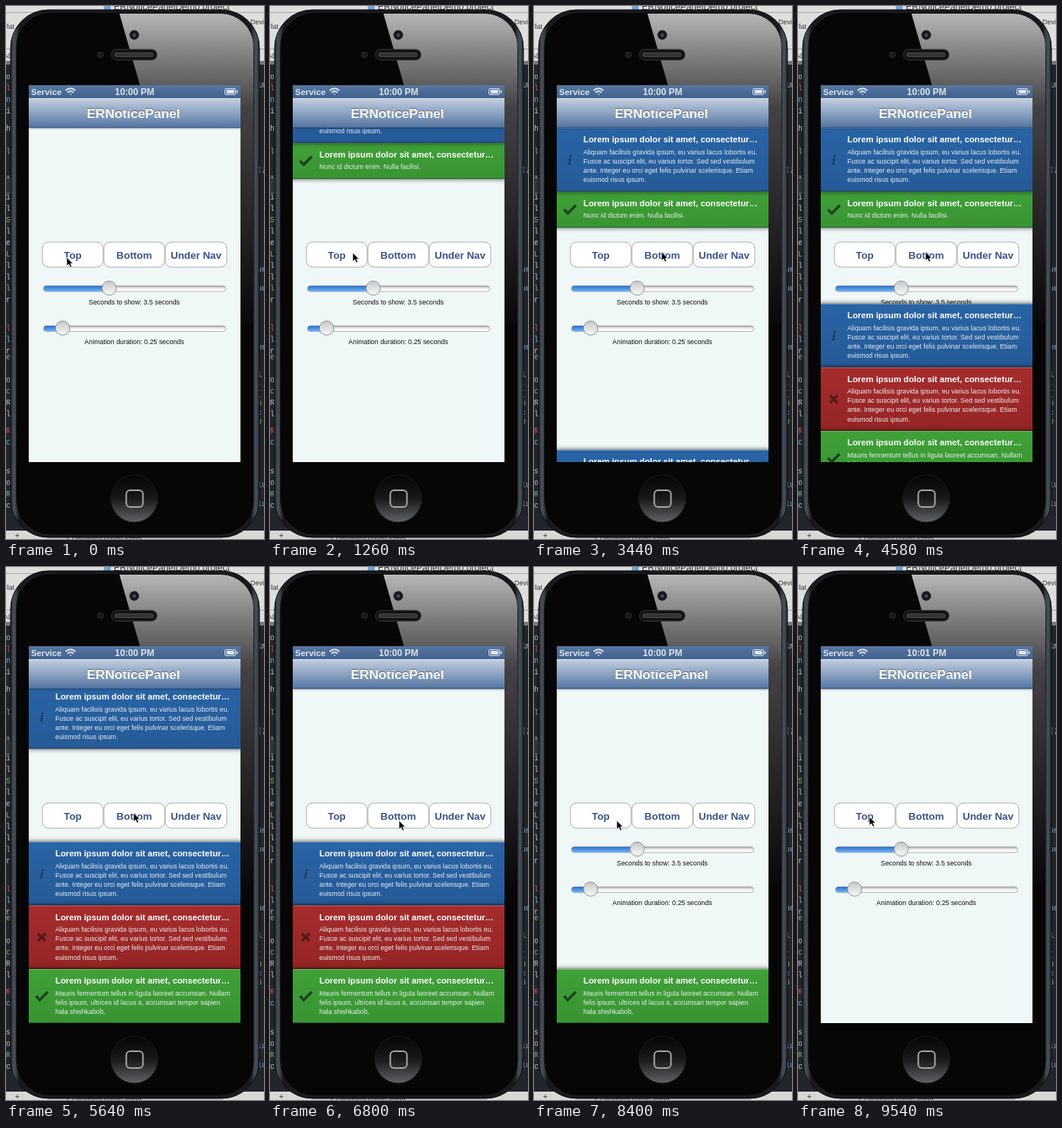
An HTML page for the animation above (9640 ms loop, 340 by 700 pixels).

```html
<!DOCTYPE html>
<html lang="en">
<head>
<meta charset="utf-8">
<title>Alert banners</title>
<style>
html, body { margin: 0; width: 100%; height: 100%; overflow: hidden; background: #23252c; }
svg { display: block; width: 340px; height: 700px; font-family: "Liberation Sans", Arial, sans-serif; }
.bold { font-weight: bold; }
.mid { text-anchor: middle; }
.code { font: 10px "Liberation Mono", "DejaVu Sans Mono", monospace; }
.shade { filter: drop-shadow(0 0 3px rgba(0, 0, 0, .75)); }
.nav { filter: drop-shadow(0 1px 1px rgba(30, 50, 80, .5)); }
.title { filter: drop-shadow(0 -1px 0 rgba(0, 0, 0, .4)); }
</style>
</head>
<body>
<svg viewBox="0 0 340 700">
  <defs>
    <linearGradient id="gloss" x1="0" y1="0" x2="0" y2="1">
      <stop offset="0" stop-color="#b6b6b6"/><stop offset=".12" stop-color="#858585"/>
      <stop offset=".3" stop-color="#434345"/><stop offset="1" stop-color="#08080a"/>
    </linearGradient>
    <linearGradient id="rim">
      <stop offset="0" stop-color="#1d2125"/><stop offset=".012" stop-color="#485058"/>
      <stop offset=".022" stop-color="#3b4248"/><stop offset=".034" stop-color="#17191c"/>
      <stop offset=".966" stop-color="#17191c"/><stop offset=".978" stop-color="#3b4248"/>
      <stop offset=".988" stop-color="#485058"/><stop offset="1" stop-color="#1d2125"/>
    </linearGradient>
    <linearGradient id="status" x1="0" y1="0" x2="0" y2="1">
      <stop offset="0" stop-color="#5777a1"/><stop offset="1" stop-color="#40618d"/>
    </linearGradient>
    <linearGradient id="bar" x1="0" y1="0" x2="0" y2="1">
      <stop offset="0" stop-color="#c3cfdf"/><stop offset=".5" stop-color="#8ca3c2"/>
      <stop offset="1" stop-color="#5373a0"/>
    </linearGradient>
    <linearGradient id="home" x1="0" y1="0" x2="0" y2="1">
      <stop offset="0" stop-color="#050506"/><stop offset=".5" stop-color="#18191a"/>
      <stop offset="1" stop-color="#626365"/>
    </linearGradient>
    <linearGradient id="groove" x1="0" y1="0" x2="0" y2="1">
      <stop offset="0" stop-color="#a9a9a9"/><stop offset=".5" stop-color="#f4f4f4"/>
      <stop offset="1" stop-color="#fff"/>
    </linearGradient>
    <linearGradient id="fill" x1="0" y1="0" x2="0" y2="1">
      <stop offset="0" stop-color="#2b6fc6"/><stop offset="1" stop-color="#76b6f8"/>
    </linearGradient>
    <linearGradient id="knob" x1="0" y1="0" x2="0" y2="1">
      <stop offset="0" stop-color="#c6c6c6"/><stop offset="1" stop-color="#fafafa"/>
    </linearGradient>
    <linearGradient id="info" x1="0" y1="0" x2="0" y2="1">
      <stop offset="0" stop-color="#2964a5"/><stop offset="1" stop-color="#265a98"/>
    </linearGradient>
    <linearGradient id="error" x1="0" y1="0" x2="0" y2="1">
      <stop offset="0" stop-color="#a62c2d"/><stop offset="1" stop-color="#952525"/>
    </linearGradient>
    <linearGradient id="success" x1="0" y1="0" x2="0" y2="1">
      <stop offset="0" stop-color="#40a138"/><stop offset="1" stop-color="#389432"/>
    </linearGradient>
    <clipPath id="screen"><rect x="30" y="104" width="279" height="495"/></clipPath>
  </defs>

  <!-- editor window behind the phone -->
  <rect width="340" height="700" fill="#23252c"/>
  <rect width="340" height="72" fill="#dedede"/>
  <path d="M0 8.5H340M0 56.5H340" stroke="#a6a6a6"/>
  <rect y="72" width="340" height="5" fill="#777b80"/>
  <rect y="689" width="340" height="11" fill="#d8d8d8"/>
  <g fill="#333">
    <rect x="129" width="9" height="5" fill="#6fa3dc"/>
    <text x="142" y="5" font-size="12">ERNoticePanelDemo.project</text>
    <text x="322" y="24" font-size="9">Device</text>
    <text x="-4" y="30" font-size="9">Flat</text>
    <text x="-3" y="69" font-size="9">All</text>
    <text x="80" y="704" font-size="10.500">ERNoticePanelDemo</text>
    <text x="12" y="699" font-size="10">+</text>
  </g>
  <g id="code" class="code"></g>
  <rect x="-3" y="226" width="9" height="20" rx="2" fill="#30333a" stroke="#6b6e74"/>

  <!-- phone -->
  <rect x="6" y="5" width="328" height="693" rx="50" fill="url(#rim)" stroke="#0b0c0e"/>
  <rect x="14" y="10" width="312" height="683" rx="44" fill="#060607" stroke="#000"/>
  <path d="M149.500 10H283A43 43 0 0 1 326 53V420H309V104H176.500Z" fill="url(#gloss)"/>
  <circle cx="169" cy="38" r="6" fill="#17181c" stroke="#2b2c30"/>
  <circle cx="169" cy="38" r="2.500" fill="#3b4760"/>
  <circle cx="124.500" cy="64" r="4" fill="#1b1b1f" stroke="#2c2c30"/>
  <rect x="139" y="57" width="60" height="14" rx="7" fill="#111" stroke="#3a3a3a"/>
  <rect x="143" y="61" width="52" height="6" rx="3" fill="#4a4a4a"/>
  <path d="M145 64H194" stroke="#1c1c1c" stroke-width="4" stroke-dasharray="1 1"/>
  <circle cx="169" cy="647" r="31" fill="url(#home)" stroke="#1a1a1b"/>
  <rect x="158.500" y="636" width="22" height="22" rx="5" fill="none" stroke="#a6a6a6" stroke-width="2"/>

  <g clip-path="url(#screen)">
    <rect x="30" y="104" width="279" height="495" fill="#f0f7f7"/>
    <g id="controls"></g>
    <g id="banners"></g>
    <rect class="nav" x="30" y="121" width="279" height="39" fill="url(#bar)"/>
    <path d="M30 121.500H309" stroke="#dbe3ed"/>
    <path d="M30 159.500H309" stroke="#3c5a85"/>
    <text class="bold mid title" x="168" y="146.500" font-size="17.300" fill="#fff">ERNoticePanel</text>
    <rect x="30" y="104" width="279" height="17" fill="url(#status)"/>
    <g class="bold" fill="#dce4ee">
      <text x="33" y="117" font-size="11.300">Service</text>
      <text id="clock" class="mid" x="169.500" y="117" font-size="12"></text>
    </g>
    <g fill="none" stroke="#dce4ee" stroke-width="1.800">
      <path d="M78.500 111Q85 105.500 91.500 111M81 113.700Q85 110.200 89 113.700"/>
      <rect x="288.500" y="108.500" width="14" height="8" rx="1.500" stroke-width="1"/>
      <path d="M290.500 112.500H301" stroke-width="5"/>
      <path d="M304.500 110.500V114.500" stroke-width="1.500"/>
      <path d="M83.500 115.300H86.500L85 117Z" fill="#dce4ee" stroke="none"/>
    </g>
  </g>
  <path id="cursor" d="M0 0V11.500L2.700 9L4.700 13.300L6.800 12.300L4.900 8.200H8.500Z" fill="#000" stroke="#fff" stroke-width=".8"/>
</svg>
<script>
const $ = id => document.getElementById(id);
const text = (x, y, size, s, extra = '') =>
  `<text x="${x}" y="${y}" font-size="${size}" ${extra}>${s}</text>`;

// Slivers of code on both sides of the phone
const tints = ['#b9bcc0', '#b9bcc0', '#76a8c9', '#b9bcc0', '#c34a58', '#7fae6b'];
const leftCode = 'o l n i  h   l    l  i l S l e L l l l r    l l re   o c R l  R c    s o R c'.split('');
$('code').innerHTML = leftCode.map((c, i) =>
  text(0, 96 + i * 7.5, 10, c, `fill="${tints[i * 5 % 6]}"`)).join('') +
  [[107, 'im', 0], [218, '];', 0], [349, 'ue', 2], [374, 'ue', 2], [451, 'ue', 2], [487, 'l', 0],
   [512, '(', 0], [525, 'D', 5], [537, 'c', 2], [549, 'D', 5], [632, 'lu', 2], [657, 'lu', 2]]
    .map(([y, s, c]) => text(331, y, 10, s, `fill="${tints[c]}"`)).join('');

const button = (x, w, label) =>
  `<rect x="${x + .5}" y="310" width="${w}" height="33" rx="8" fill="#fff" stroke="#aaadb0"/>` +
  text(x + w / 2 + .5, 331.5, 13.4, label, 'class="bold mid" fill="#385487"');
const slider = (y, x, label) =>
  `<rect x="49.500" y="${y - 3}" width="240" height="7.500" rx="3.700" fill="url(#groove)" stroke="#999" stroke-width=".7"/>
   <rect x="49.500" y="${y - 3}" width="${x - 49}" height="7.500" rx="3.700" fill="url(#fill)"/>
   <circle cx="${x}" cy="${y}" r="9.300" fill="url(#knob)" stroke="#929292"/>` +
  text(169, y + 21, 8.85, label, 'class="mid" fill="#111"');
$('controls').innerHTML = button(47.5, 80, 'Top') + button(128.5, 80, 'Bottom') + button(209.5, 81, 'Under Nav') +
  slider(370.5, 136, 'Seconds to show: 3.5 seconds') + slider(423, 74.5, 'Animation duration: 0.25 seconds');

const long = ['Aliquam facilisis gravida ipsum, eu varius lacus lobortis eu.',
  'Fusce ac suscipit elit, eu varius tortor. Sed sed vestibulum',
  'ante. Integer eu orci eget felis pulvinar scelerisque. Etiam', 'euismod risus ipsum.'];
const short = ['Nunc id dictum enim. Nulla facilisi.'];
const medium = ['Mauris fermentum tellus in ligula laoreet accumsan. Nullam',
  'felis ipsum, ultrices id lacus a, accumsan tempor sapien', 'hala shishkabob.'];
const banners = [
  { kind: 'success', top: true, h: 47.5, start: 720, lines: short },
  { kind: 'info', top: true, h: 83.5, start: 1220, lines: long },
  { kind: 'info', h: 83.5, start: 3408, lines: long },
  { kind: 'error', h: 83.5, start: 3690, lines: long },
  { kind: 'success', h: 71, start: 4467, lines: medium }
];
const icons = {
  info: text(47, 6, 17, 'i', 'class="mid" style="font:italic bold 17px \'Liberation Serif\',serif" fill="#1c3450"'),
  error: '<path d="M42 -5L52 5M52 -5L42 5" stroke="#561a1b" stroke-width="3.600"/>',
  success: '<path d="M39.500 0L44.500 5L55 -5.500" fill="none" stroke="#1f4220" stroke-width="3.600"/>'
};
$('banners').innerHTML = banners.map(b => `<g>
  <rect class="shade" x="26" width="287" height="${b.h}" fill="url(#${b.kind})"/>
  <path d="M30 .5H309" stroke="#fff" opacity=".25"/>
  <path d="M30 ${b.h - .5}H309" stroke="#000" opacity=".35"/>
  <g transform="translate(0 ${b.h / 2})">${icons[b.kind]}</g>
  ${text(65, 19, 11.3, 'Lorem ipsum dolor sit amet, consectetur…', 'class="bold" fill="#fff"')}
  ${b.lines.map((s, i) => text(65, 34.5 + i * 12.2, 8.8, s, 'fill="#e9eef2"')).join('')}</g>`).join('');
banners.forEach((b, i) => b.el = $('banners').children[i]);

const LOOP = 9640, SLIDE = 280, LIFE = 4380;
const clamp = p => Math.min(1, Math.max(0, p));
const easeOut = p => p * (1.7 - .7 * p);
const shown = (b, t) => easeOut(clamp((t - b.start) / SLIDE));
const hidden = (b, t) => 1 - easeOut(1 - clamp((t - b.start - LIFE) / SLIDE));

// time, x, y of the pointer
const path = [[0, 80, 330], [560, 109, 324], [2300, 109, 324], [3200, 168, 323], [5900, 168, 323],
  [6500, 170, 333], [7100, 170, 333], [8200, 109, 333], [8500, 109, 333], [9240, 94, 328], [LOOP, 94, 328]];
function pointer(t) {
  const i = path.findIndex(k => k[0] > t), [t0, x0, y0] = path[i - 1], [t1, x1, y1] = path[i];
  const p = (t - t0) / (t1 - t0), e = p * p * (3 - 2 * p);
  return `translate(${x0 + (x1 - x0) * e} ${y0 + (y1 - y0) * e})`;
}

function draw(now) {
  const t = now % LOOP;
  banners.forEach((b, i) => {
    // newer banners on the same edge push this one inwards
    let reach = b.h * (shown(b, t) - hidden(b, t));
    banners.slice(i + 1).forEach(n => { if (n.top === b.top) reach += n.h * shown(n, t); });
    const y = b.top ? 160 - b.h + reach : 599 - reach;
    b.el.setAttribute('transform', `translate(0 ${y})`);
    b.el.style.display = t > b.start && t < b.start + LIFE + SLIDE ? '' : 'none';
  });
  $('clock').textContent = t < 9540 ? '10:00 PM' : '10:01 PM';
  $('cursor').setAttribute('transform', pointer(t));
  requestAnimationFrame(draw);
}
draw(0);
</script>
</body>
</html>
```
